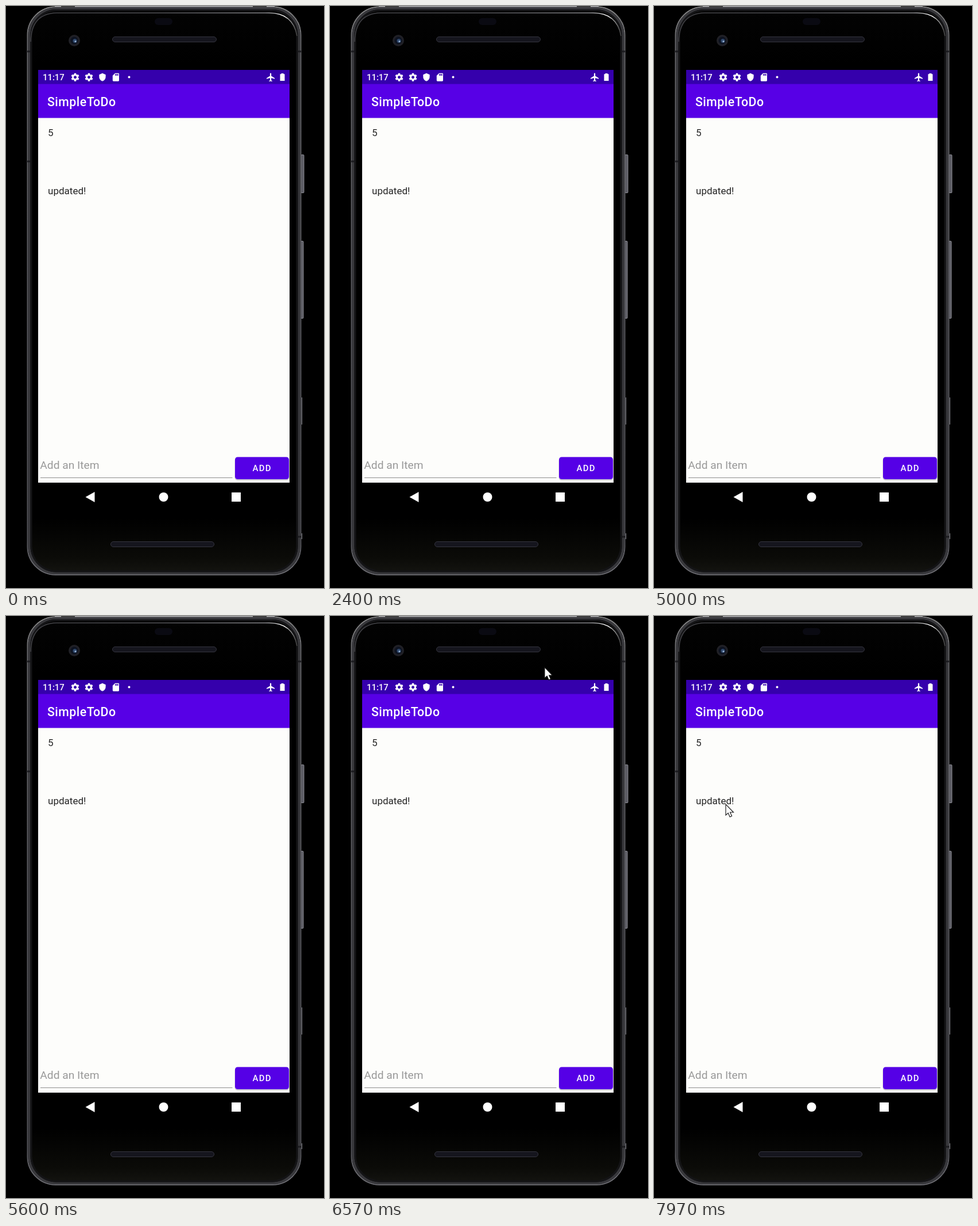
An HTML page for the animation above (8 s loop, 554x1011 px).

```html
<!DOCTYPE html>
<html lang="en">
<head>
<meta charset="utf-8">
<title>To-do app demo</title>
<style>
  html, body { margin: 0; width: 100%; height: 100%; overflow: hidden; background: #000; }
  svg { display: block; width: 554px; height: 1011px; }
  text { font-family: Roboto, sans-serif; white-space: pre; }
  .medium { font-weight: 500; fill: #fff; }
  .item { font-size: 17.05px; fill: #242424; }
</style>
</head>
<body>
<svg viewBox="0 0 554 1011">
  <defs>
    <linearGradient id="body" x2="0" y2="1">
      <stop offset="0" stop-color="#030303"/>
      <stop offset=".1" stop-color="#000"/>
      <stop offset=".9" stop-color="#000"/>
      <stop offset=".97" stop-color="#0b0b08"/>
      <stop offset="1" stop-color="#151511"/>
    </linearGradient>
    <linearGradient id="rim" x2="0" y2="1">
      <stop offset="0" stop-color="#8a8a8a"/>
      <stop offset=".06" stop-color="#6c6c70"/>
      <stop offset=".5" stop-color="#5c5c62"/>
      <stop offset=".94" stop-color="#54545a"/>
      <stop offset="1" stop-color="#74747a"/>
    </linearGradient>
    <linearGradient id="shine">
      <stop offset="0" stop-color="#404044"/>
      <stop offset=".5" stop-color="#55555a"/>
      <stop offset=".88" stop-color="#88888c"/>
      <stop offset=".95" stop-color="#f0f0f0"/>
      <stop offset="1" stop-color="#444"/>
    </linearGradient>
    <path id="gear" fill="#fff" fill-rule="evenodd" d="M-1.6-7h3.2l.4 2 1.4.8 1.9-.7 1.6 2.7-1.6 1.3v1.8l1.6 1.3-1.6 2.7-1.9-.7-1.4.8-.4 2h-3.2l-.4-2-1.4-.8-1.9.7-1.6-2.7 1.6-1.3v-1.8l-1.6-1.3 1.6-2.7 1.9.7 1.4-.8zM0-2.5a2.5 2.5 0 1 0 .01 0z"/>
  </defs>

  <!-- side keys -->
  <g fill="#5c5c64" stroke="#8e8e96">
    <rect x="513.5" y="258.5" width="5.5" height="66" rx="1"/>
    <rect x="513" y="408.5" width="5" height="134" rx="1"/>
    <path d="M515.5 680v47M515.5 916v10"/>
  </g>

  <!-- shell -->
  <rect x="37.5" y="1.5" width="476" height="986.5" rx="49" fill="url(#body)" stroke="url(#rim)" stroke-width="2"/>
  <rect x="40.5" y="4" width="470" height="981.5" rx="47" fill="none" stroke="#38383c" stroke-width="4"/>
  <rect x="44" y="7.5" width="463" height="974.5" rx="44" fill="none" stroke="#141416" stroke-width="3"/>
  <path d="M43 62Q44 13 88 12H458Q500 12 507 52" fill="none" stroke="url(#shine)" stroke-width="1.5"/>
  <path d="M85 .8H468" stroke="#a0a0a2" stroke-width="1.6"/>
  <path d="M96 .8h24M430 .8h24" stroke="#222" stroke-width="1.6"/>
  <path d="M37 79h5M37 270h5M509 79h5M509 922h5" stroke="#1c1c20" stroke-width="3"/>

  <g fill="#15151d" stroke="#34343f">
    <rect x="185.5" y="53.5" width="181" height="9" rx="4.5"/>
    <rect x="182.5" y="930.5" width="180" height="9" rx="4.5"/>
  </g>
  <rect x="259" y="21" width="31" height="12" rx="6" fill="#0a0a12"/>
  <circle cx="119" cy="60" r="10" fill="#202026"/>
  <circle cx="119" cy="60" r="6.5" fill="#0c1220"/>
  <circle cx="120" cy="60.5" r="3.5" fill="#30486c"/>
  <circle cx="121" cy="61.5" r="1.5" fill="#9ab4d4"/>

  <!-- screen -->
  <rect x="56" y="111" width="438" height="717" fill="#fdfdfb"/>
  <rect x="56" y="135" width="438" height="59.5" fill="#5700e6"/>
  <rect x="56" y="111" width="438" height="24.5" fill="#3500ac"/>
  <text class="medium" x="64" y="129.3" font-size="14.9">11:17</text>
  <use href="#gear" x="120.5" y="123.8"/>
  <use href="#gear" x="144.5" y="123.8"/>
  <g fill="#fff">
    <path transform="translate(160.4 116) scale(.63)" d="M12 1L3 5v6c0 5.55 3.84 10.74 9 12 5.16-1.26 9-6.45 9-12V5z"/>
    <path transform="translate(183 115.3) scale(.7)" d="M18 2h-8L4 8v12a2 2 0 0 0 2 2h12a2 2 0 0 0 2-2V4a2 2 0 0 0-2-2zm-6 6h-2V4h2zm3 0h-2V4h2zm3 0h-2V4h2z"/>
    <circle cx="214.5" cy="123.5" r="2"/>
    <path transform="translate(452.5 114.9) scale(.74)" d="M21 16v-2l-8-5V3.5a1.5 1.5 0 0 0-3 0V9l-8 5v2l8-2.5V19l-2 1.5V22l3.5-1 3.5 1v-1.5L13 19v-5.5z"/>
    <path d="M479.5 117h4v1.3h2V130h-8v-11.7h2z"/>
  </g>
  <text class="medium" x="72" y="173.8" font-size="21.3" letter-spacing=".5">SimpleToDo</text>

  <text class="item" x="73" y="226.3">5</text>
  <text class="item" x="73" y="327.3">updated!</text>
  <text x="59.3" y="803.7" font-size="19.2" fill="#999">Add an Item</text>
  <path d="M60 819.5H394.5" stroke="#8c8c8c"/>
  <rect x="398.5" y="785" width="95" height="39" rx="5" fill="#ccc8d4"/>
  <rect x="399" y="783.5" width="94" height="38.5" rx="4.5" fill="#5500e6"/>
  <text class="medium" x="429.5" y="808.3" font-size="14.9" letter-spacing="1.33">ADD</text>

  <!-- navigation -->
  <g fill="#fff">
    <path d="M138.5 853L154.5 844V862z"/>
    <circle cx="274.5" cy="853" r="8"/>
    <rect x="393" y="845" width="16" height="16"/>
  </g>

  <path id="cursor" d="M0 0V19L4.2 15.2L7.2 22L10.6 20.5L7.6 14H13.5z" fill="#fff" stroke="#111" stroke-width="1.1" visibility="hidden"/>
</svg>
<script>
  const LOOP = 8000;
  // time, x, y of the pointer tip
  const path = [
    [5900, 553, 236], [6140, 519, 205], [6340, 445, 138], [6570, 374, 89], [6740, 362, 92],
    [7080, 300, 132], [7400, 200, 230], [7650, 140, 305], [7800, 125, 327], [8000, 125, 327]
  ];
  const cursor = document.getElementById("cursor");

  function draw(now) {
    const t = now % LOOP;
    const next = path.findIndex(p => p[0] > t);
    cursor.setAttribute("visibility", next > 0 ? "visible" : "hidden");
    if (next > 0) {
      const [t0, x0, y0] = path[next - 1], [t1, x1, y1] = path[next];
      const k = (t - t0) / (t1 - t0);
      cursor.setAttribute("transform", `translate(${x0 + (x1 - x0) * k} ${y0 + (y1 - y0) * k})`);
    }
    requestAnimationFrame(draw);
  }
  requestAnimationFrame(draw);
</script>
</body>
</html>
```
